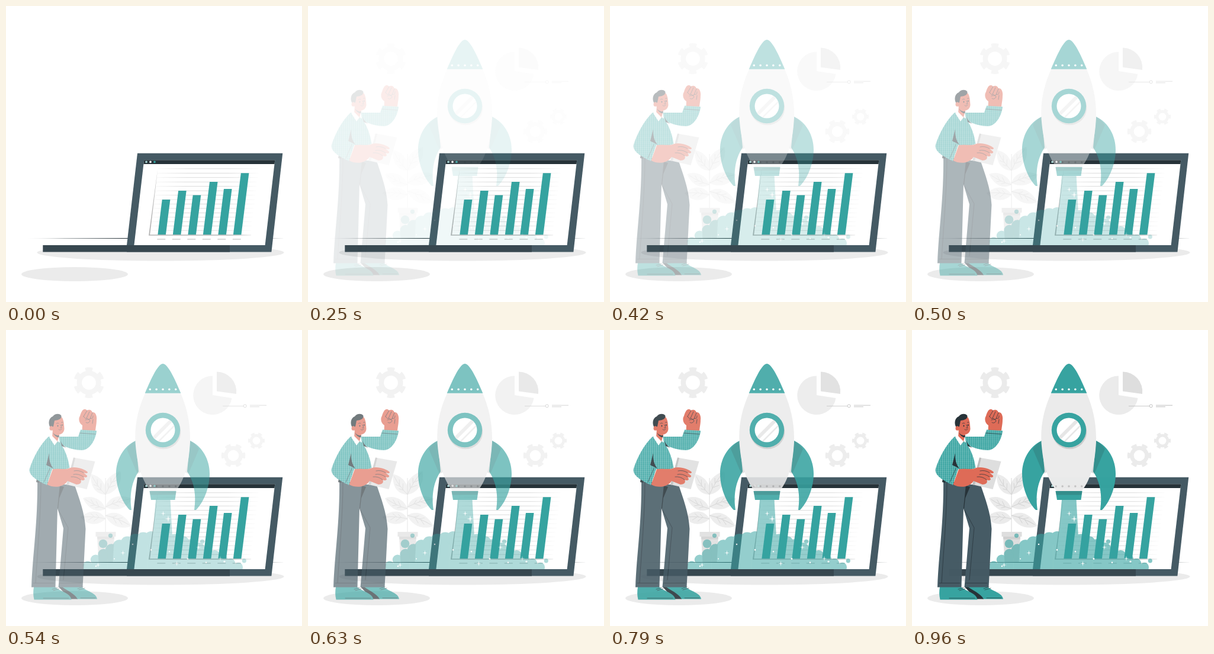
An HTML page for the animation above (1000 ms loop, 500 px wide and 500 px high).

```html
<!DOCTYPE html>
<html lang="en">
<head>
<meta charset="utf-8">
<title>Launch</title>
<style>
  html, body { margin: 0; width: 100%; height: 100%; overflow: hidden; background: #fff; }
  svg { display: block; width: 100%; height: 100%; }
  .fade { animation: fade 1s cubic-bezier(.42, 0, .68, 1) infinite; }
  @keyframes fade { from { opacity: 0; } to { opacity: 1; } }
  .teal { fill: #36a3a0; }
  .slate { fill: #455a64; }
  .ink { fill: #263238; }
  .pale { fill: #ebebeb; }
  .grey { fill: #dedede; }
  .skin { fill: #de6a56; }
  .line { fill: none; stroke: #263238; stroke-width: .7; stroke-linecap: round; stroke-linejoin: round; }
  .vein { fill: none; stroke: #cfcfcf; stroke-width: .8; }
  .gear { fill: none; stroke: #ebebeb; }
</style>
</head>
<body>
<svg viewBox="0 0 500 500">
  <defs>
    <linearGradient id="floor">
      <stop offset="0" stop-color="#263238" stop-opacity=".15"/>
      <stop offset=".15" stop-color="#263238"/>
      <stop offset=".85" stop-color="#263238"/>
      <stop offset="1" stop-color="#263238" stop-opacity=".1"/>
    </linearGradient>
    <linearGradient id="rule">
      <stop offset="0" stop-color="#d2d2d2" stop-opacity=".2"/>
      <stop offset=".3" stop-color="#d2d2d2"/>
      <stop offset=".7" stop-color="#d2d2d2"/>
      <stop offset="1" stop-color="#d2d2d2" stop-opacity=".1"/>
    </linearGradient>
    <linearGradient id="axis">
      <stop offset=".8" stop-color="#b5b5b5"/>
      <stop offset="1" stop-color="#b5b5b5" stop-opacity=".2"/>
    </linearGradient>
    <pattern id="knit" width="3.4" height="3.4" patternUnits="userSpaceOnUse">
      <path d="M0 .4H3.4M.4 0V3.4" stroke="#fff" stroke-opacity=".4" stroke-width=".6"/>
    </pattern>
    <clipPath id="ground"><rect x="125" y="280" width="280" height="124"/></clipPath>
    <clipPath id="glass"><circle cx="265" cy="169" r="20.5"/></clipPath>
    <g id="cog" class="gear">
      <circle r="16.2" stroke-width="8.6"/>
      <circle r="22.8" stroke-width="6.4" pathLength="12" stroke-dasharray="1 1" stroke-dashoffset=".5"/>
    </g>
    <g id="fin">
      <path class="teal" d="M219 187C198 197 186 219 186 243C186 266 196 291 209 304H212C209 284 210 260 224 239Z"/>
      <path class="ink" opacity=".17" d="M219 187Q210 192 204 201L222 243L228 240Z"/>
    </g>
    <g id="leaf">
      <path class="pale" d="M0 0C8 -15 25 -17 42 -3C32 11 12 13 0 0Z"/>
      <path class="vein" d="M0 0Q20 -5 38 -3M10 -2L16 -8M18 -3L25 -9M12 -2L20 4M21 -3L29 2"/>
    </g>
    <path id="sweater" d="M72 180C58 193 46 215 40 234C37 245 52 254 69 262L78 235Q95 238 107.500 233C105 217 101 206 94 194C105 200 118 203 128 203C142 203 152 184 153 170L126 168.500L122 180H88Z"/>
  </defs>

  <ellipse class="pale" cx="261" cy="416.5" rx="208.5" ry="14"/>
  <ellipse class="pale" cx="116" cy="453" rx="90" ry="12"/>
  <path d="M33 392.2L200 391.9H440L468 392.300V392.700L440 392.900H200Z" fill="url(#floor)"/>

  <g class="fade">
    <use href="#cog" transform="translate(140 89) rotate(30)"/>
    <use href="#cog" transform="translate(384 212) scale(.78)"/>
    <use href="#cog" transform="translate(423 187) scale(.545)"/>
    <path class="pale" d="M349 77.500A32.800 32.800 0 1 0 381.500 115L349 110Z"/>
    <path class="grey" d="M356 70.500A33.500 33.500 0 0 1 389 108L356 103.500Z"/>
    <g fill="none" stroke="#bdbdbd">
      <path d="M366 128.500H401" stroke-width=".8"/>
      <circle cx="403.7" cy="128.3" r="2.5"/>
      <path d="M412 127.200H440M412 129.700H428"/>
    </g>
    <g id="plant"></g>
    <path class="grey" d="M154 349H183L180.500 392H156.500Z"/>
    <path fill="#d0d0d0" d="M154 349H183L182.700 353.500H154.300Z"/>
    <path class="grey" d="M151.500 341H185.500V349H151.500Z"/>
  </g>

  <path class="slate" d="M222 248.700H467.300L448.400 415.600H204V404Z"/>
  <path fill="#37474f" d="M62.300 404H378V415.600H62.300Z"/>
  <path fill="#fff" d="M233.200 260.200H454.300L437.600 404H216.400Z"/>
  <path class="ink" d="M233.200 260.200H454.300L453.500 267H232.400Z"/>
  <circle cx="237" cy="263.4" r="1.8" fill="#a9d6d5"/>
  <circle cx="244" cy="263.4" r="1.8" fill="#fff"/>
  <circle cx="251" cy="263.4" r="1.8" class="teal"/>
  <g id="chart"></g>
  <path d="M256.300 275L241 387.800H414V386.200H243.200Z" fill="url(#axis)"/>

  <g class="fade">
    <g opacity=".61" class="teal">
      <g id="smoke" clip-path="url(#ground)">
        <path d="M253 286H277.500L284 404H243Z"/>
      </g>
      <circle cx="331.5" cy="357.3" r="3.6"/>
      <circle cx="402.3" cy="389.8" r="3.6"/>
      <circle cx="176.5" cy="347.3" r="3.6"/>
      <circle cx="164" cy="361" r="7.3"/>
    </g>
    <g id="sparks" fill="#fff"></g>

    <use href="#fin"/>
    <use href="#fin" transform="matrix(-1 0 0 1 530 0)"/>
    <path class="teal" d="M242.500 272H287.500L285.500 287H245Z"/>
    <path class="ink" opacity=".2" d="M242.500 272H287.500L286.700 278.500H243.600Z"/>
    <path class="pale" d="M235 107C223 133 215 165 219.500 201C223 235 233 259 244.500 272H286.500C299 257 308 233 310.500 196C313 162 306 132 295 107Z"/>
    <path class="teal" d="M265 57C257 57 246 80 234.700 106.700H295.300C284 80 273 57 265 57Z"/>
    <g id="rivets"></g>
    <circle cx="266" cy="172" r="29.3" fill="#ccc"/>
    <circle cx="265" cy="169" r="29.2" class="teal"/>
    <circle cx="265" cy="169" r="20.5" fill="#fff"/>
    <g clip-path="url(#glass)" stroke="#e6e6e6">
      <path d="M247 185L283 149" stroke-width="6"/>
      <path d="M254 192L290 156" stroke-width="2.5"/>
    </g>
  </g>

  <g class="fade">
    <path class="teal" d="M92 434H128C135 441 153 444 154 454.500H120Z"/>
    <path class="ink" d="M89 434H95C101 439 116 445 121 454.500H108Z"/>
    <path class="teal" d="M47 434H83C90 441 109 444 110.500 455.500H47.500Q45 445 47 434Z"/>
    <path class="line" d="M78 438L87 435M80 440L90 437M121 437L130 434M123 439L133 436M63 453H106M126 452.700H151"/>
    <path class="slate" d="M86 260L116 262C123 283 133 308 134.500 336L129.500 434.500H88.500L97 335L86 298Z"/>
    <path class="ink" d="M86 262L98 265L90 284L88 302L84 300Z"/>
    <path class="slate" d="M53 251L91 262L87 300L83.500 434.500H43C45 377 54 326 53 251Z"/>
    <path class="ink" d="M52 250L58 252L56 258L51 257Z"/>
    <path class="line" d="M59 257C59 310 53 377 50 427M46 427.500H81M91 427.500H127M88 303L105 334L97 422"/>

    <path class="grey" d="M114 215.500L150.500 222L136.500 269L102 261Z"/>
    <path fill="#bdbdbd" d="M114 215.500L117 216L106 262L102 261Z"/>

    <path class="skin" d="M128.500 172L129 161C123 157 122 150 125 145C128 134 133 131 137 136C141 133 145 136 146 139C151 138 154 145 153 152C153 160 151 165 151 173Z"/>
    <path class="line" d="M131 146L137 136M136 149L141 138M142 150L146 140M131 146Q134 151 137 149Q140 153 143 149Q147 151 147 145M134 152Q141 149 142 154Q138 159 135 156M147 151L146 158"/>

    <use href="#sweater" class="teal"/>
    <use href="#sweater" fill="url(#knit)"/>
    <path class="ink" d="M73 208L68 228L80 234Q72 225 73 208ZM92 187Q95 195 102 199L94 196Z"/>
    <path class="line" d="M64 257L74 234M125 174L151 176"/>

    <path class="skin" d="M69.500 261L79 235C91 233 99 237 108 233C118 230 133 235 138 240C138 243 134 242 131 241L137 246C138 249 134 250 131 248L133 252C132 255 128 254 126 253C129 258 124 261 119 261L104 255C98 265 82 268 69.500 261Z"/>
    <path class="line" d="M131 241Q123 236 115 238M131 248Q122 242 114 244M126 253Q119 247 110 248"/>

    <path class="skin" d="M79 168L90 172V185L86 190L78 181Z"/>
    <path class="ink" d="M79 173Q83 179 90 178V182Q82 180 79 173Z"/>
    <path fill="#fff" d="M77 178L87 188L82 195L73 181ZM89.500 179L91 190L87 188Z"/>
    <path class="skin" d="M79 151L94 147C98 152 98 160 98.500 167C98 175 91 178 85 176C80 174 77 170 77 160Z"/>
    <path class="ink" d="M75 165C70 157 73 148 79 146C82 141 91 140 93.500 145C94 149 91 152 82 153L80 163Z"/>
    <ellipse class="skin" cx="76.500" cy="166" rx="3" ry="3.800"/>
    <ellipse class="ink" cx="87.500" cy="162" rx=".9" ry="1.400"/>
    <ellipse class="ink" cx="94.800" cy="160.700" rx=".9" ry="1.400"/>
    <path class="line" d="M85 158Q87 156 89 157.500M93.500 156H96M92 160L94 165L91.500 165.500M89 168Q92 170.500 94 167"/>
  </g>
</svg>
<script>
  const put = (id, markup) => { document.getElementById(id).innerHTML += markup; };
  const range = (n, make) => Array.from({ length: n }, (_, i) => make(i)).join("");
  const dot = (x, y, r, fill = "inherit") => `<circle cx="${x}" cy="${y}" r="${r}" style="fill:${fill}"/>`;
  const star = (x, y, r) => {
    const k = r * .14;
    return `<path d="M${x} ${y - r}l${k} ${r - k}l${r - k} ${k}l${k - r} ${k}l${-k} ${r - k}l${-k} ${k - r}l${k - r} ${-k}l${r - k} ${-k}Z"/>`;
  };
  let seed = 11;
  const rand = () => (seed = seed * 16807 % 2147483647) / 2147483647;

  // Three pairs of leaves that open wider towards the pot
  const stem = [278, 302, 319];
  put("plant", stem.map((y, i) => {
    const left = -122 - 29 * i, right = -54 + 40 * i;
    return `<use href="#leaf" transform="translate(168 ${y}) rotate(${left}) scale(1 ${i < 2 ? .9 : -1})"/>` +
      `<use href="#leaf" transform="translate(168 ${y - 3 * i}) rotate(${right}) scale(1.12 1)"/>`;
  }).join("") + `<path class="vein" d="M168 250V342"/>`);

  // Leaning chart; bar heights are counted in grid rows
  const base = 386.5, row = 7.45, lean = .125;
  const rows = range(15, i => {
    const h = (i + 1) * row;
    return `<rect x="${243 + h * lean}" y="${base - h - .3}" width="170" height=".8" fill="url(#rule)"/>`;
  });
  const bars = [8, 10, 9, 12, 10.4, 14].map((n, i) => {
    const x = 256.3 + i * 25.5, h = n * row, d = h * lean;
    return `<path class="teal" d="M${x} ${base}l${d} ${-h}h13.6l${-d} ${h}Z"/>` +
      `<rect x="${x - 1}" y="393.2" width="14" height="1.5" fill="#cfcfcf"/>`;
  });
  put("chart", rows + bars.join(""));

  // Cloud outline: a skewed sine hump, covered with round puffs
  const left = 132, width = 268, ground = 404;
  const hump = x => Math.sin(Math.PI * ((x - left) / width) ** .85);
  const rise = x => 8 + 56 * hump(x) ** 1.1;
  put("smoke", range(20, i => {
    const x = left + 6 + i * 13.4, r = 7 + 5 * hump(x), y = ground - rise(x) + r;
    return dot(x, y, r) + `<rect x="${x - 7}" y="${y}" width="14" height="90"/>`;
  }));

  const stars = [[155.5, 397], [197.5, 376.5], [265.5, 310], [288.5, 394.5], [325, 367], [362, 386]];
  put("sparks", stars.map(([x, y]) => star(x, y, 4.4)).join("") + star(274, 319, 6) + range(8, i => {
    const x = left + 20 + i * 31;
    return dot(x, ground - rise(x) * (.2 + .6 * rand()), 1 + .6 * rand());
  }));

  put("rivets", range(5, i => {
    const x = 243.3 + i * 10.85;
    return dot(x, 100.3, 1.7, "#fff") + dot(x, 264, 1.7, "#c4c4c4");
  }));
</script>
</body>
</html>
```
